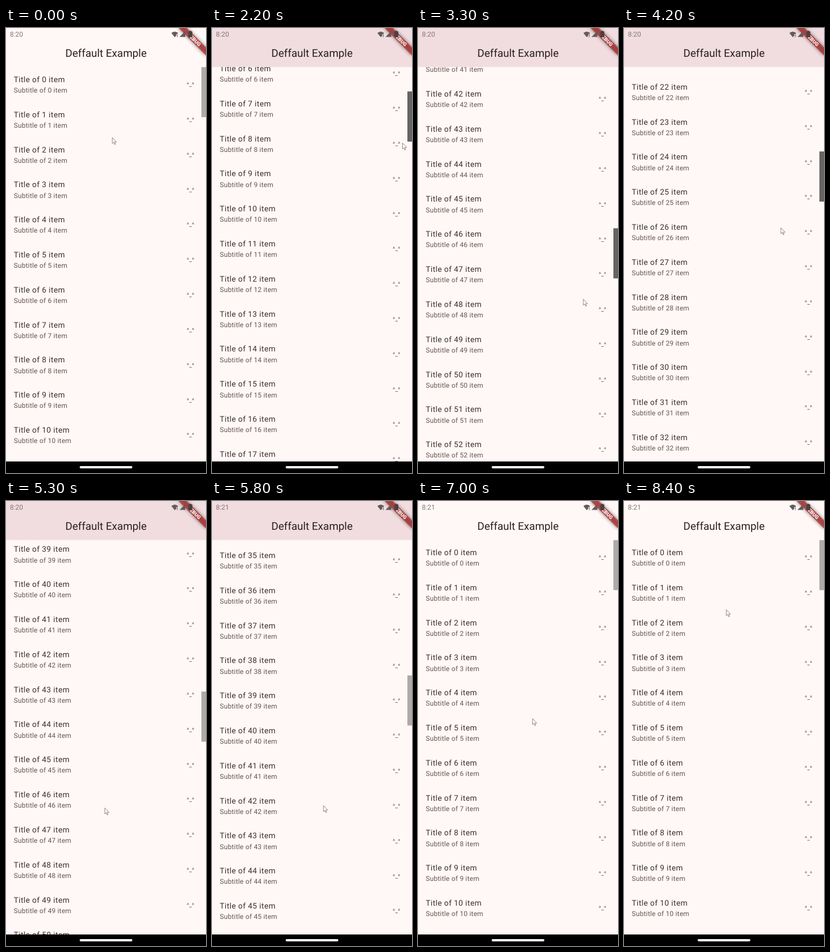
Animation of 348 by 772 pixels, one loop 9.7 s. Source, as an HTML page:

```html
<!DOCTYPE html>
<html lang="en">
<head>
<meta charset="utf-8">
<title>Scroll list</title>
<style>
  html, body { margin: 0; width: 100%; height: 100%; overflow: hidden; background: #fff8f6; }
  svg { display: block; width: 348px; height: 772px; }
  text { font-family: Roboto, "Open Sans", sans-serif; text-rendering: geometricPrecision; white-space: pre; }
  .title { font-size: 13.515px; letter-spacing: .422px; fill: #382e2d; }
  .sub { font-size: 11.826px; letter-spacing: .211px; fill: #645553; }
  .face { font-size: 9.29px; font-weight: 500; letter-spacing: .422px; fill: #695b59; }
  .heading { font-size: 18.58px; fill: #2a201f; text-anchor: middle; }
  .clock { font-size: 11.9px; fill: #807878; }
  .debug { font-size: 8.7px; font-weight: 900; fill: #fff; text-anchor: middle; }
</style>
</head>
<body>
<svg viewBox="0 0 348 772">
  <defs>
    <filter id="blur" x="-30%" y="-120%" width="160%" height="340%"><feGaussianBlur stdDeviation="3.2"/></filter>
  </defs>
  <rect width="348" height="772" fill="#fff8f6"/>
  <g id="list"></g>
  <rect id="thumb" x="340" width="8" height="87"/>
  <rect id="bar" width="348" height="67.7"/>
  <text class="heading" x="174" y="50.3">Deffault Example</text>
  <g transform="translate(348 0) rotate(45)">
    <rect x="-33.8" y="23.65" width="67.6" height="10.15" opacity=".5" filter="url(#blur)"/>
    <rect x="-33.8" y="23.65" width="67.6" height="10.15" fill="#b71c1c" fill-opacity=".63"/>
    <text class="debug" x="2.8" y="31.8">EBUG</text>
  </g>
  <text id="clock" class="clock" x="6.8" y="15"></text>
  <g fill="#625b5b">
    <path d="M287.8 8.7Q293.7 3.6 299.6 8.7L298.2 10.4H296.2V13.2L293.7 16Z"/>
    <path d="M297.4 11.2h1.3v2.8h-1.3zM297.4 14.8h1.3v1.3h-1.3z"/>
    <path d="M301.8 15.6L312 5.4V15.6Z"/>
    <path d="M319.3 4.8h3v1.2h1.9v10h-6.8v-10h1.9z" fill="#4a4042"/>
  </g>
  <rect y="752" width="348" height="20"/>
  <rect x="128.2" y="760" width="91.6" height="4" rx="2" fill="#fff"/>
  <path id="pointer" d="M0 0V10.4L2.4 8.2L4 12.2L5.6 11.5L4 7.7H7.2Z" fill="#fff" stroke="#706a6a" stroke-width=".8" stroke-linejoin="round"/>
</svg>
<script>
  const LOOP = 9700, STEP = 100;
  const TOP = 67.6, PITCH = 60.82, ROWS = 13, SCROLL_PER_THUMB = 9.04;
  const DRAG_END = 4400, CLOCK_TICK = 5600;

  // Turning points of the scroll: [time, offset]
  const swings = [[2000, 0], [2836, 2850], [DRAG_END, 1262], [5500, 2473.7], [6722, 0]];
  // Corners of the pointer's path: [time, x, y]
  const path = [
    [800, 185, 190], [1300, 340, 115], [2000, 340, 115], [2200, 331.5, 199.5],
    [2836, 294, 515], [3300, 287.7, 470.5], [4200, 273, 346.5],
    [5300, 172, 532.5], [6300, 216, 524.5], [7900, 178, 188.5]
  ];

  const linear = u => u;
  const sine = u => (1 - Math.cos(Math.PI * u)) / 2;

  // Values at time t on the way from one key to the next.
  function along(keys, t, ease) {
    const next = Math.max(1, keys.findIndex(k => k[0] > t));
    if (t >= keys.at(-1)[0]) return keys.at(-1).slice(1);
    const [t0, ...from] = keys[next - 1], [t1, ...to] = keys[next];
    const e = ease(Math.max(0, (t - t0) / (t1 - t0)));
    return from.map((v, i) => v + (to[i] - v) * e);
  }

  const byId = id => document.getElementById(id);
  const list = byId('list'), thumb = byId('thumb'), bar = byId('bar');
  const clock = byId('clock'), pointer = byId('pointer');

  function add(parent, name, attrs = {}) {
    const node = document.createElementNS('http://www.w3.org/2000/svg', name);
    for (const key in attrs) node.setAttribute(key, attrs[key]);
    return parent.appendChild(node);
  }

  const rows = Array.from({ length: ROWS }, () => {
    const group = add(list, 'g');
    const title = add(group, 'text', { class: 'title', x: 13.5, y: 26.3 });
    const sub = add(group, 'text', { class: 'sub', x: 13.5, y: 44.5 });
    add(group, 'text', { class: 'face', x: 314.6, y: 33.6 }).textContent = '^_^';
    return { group, title, sub };
  });

  const move = (node, x, y) =>
    node.setAttribute('transform', `translate(${x.toFixed(2)} ${y.toFixed(2)})`);

  function draw(t) {
    const [scroll] = along(swings, t, sine);
    const first = Math.floor(scroll / PITCH);
    rows.forEach((row, i) => {
      const n = first + i;
      row.title.textContent = `Title of ${n} item`;
      row.sub.textContent = `Subtitle of ${n} item`;
      move(row.group, 0, TOP + n * PITCH - scroll);
    });
    const dragging = scroll > 0 && t < DRAG_END;
    thumb.setAttribute('y', TOP + scroll / SCROLL_PER_THUMB);
    thumb.setAttribute('fill', dragging ? '#666362' : '#afa9a8');
    bar.setAttribute('fill', scroll > 0 ? '#f1dddf' : '#fff8f6');
    clock.textContent = t < CLOCK_TICK ? '8:20' : '8:21';
    move(pointer, ...along(path, t, linear));
  }

  const start = performance.now();
  function tick() {
    const t = (performance.now() - start) % LOOP;
    draw(Math.floor(t / STEP) * STEP);
    requestAnimationFrame(tick);
  }
  tick();
</script>
</body>
</html>
```
